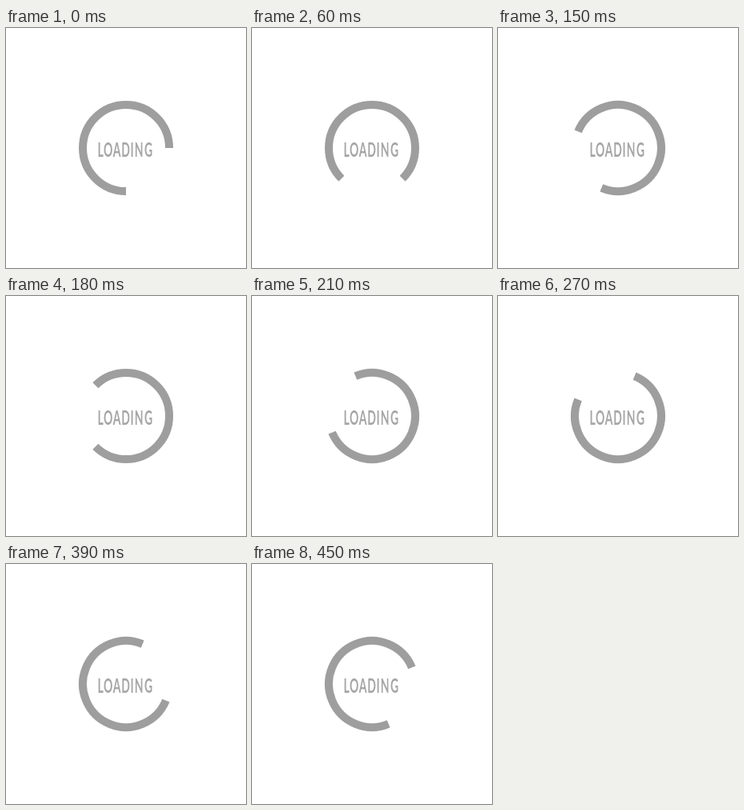
An HTML page for the animation above (480 ms loop, 300x300 px).

```html
<!DOCTYPE html>
<html lang="en">
<head>
<meta charset="utf-8">
<title>Loading</title>
<style>
  html, body { margin: 0; width: 100%; height: 100%; overflow: hidden; background: #fff; }
  svg { display: block; width: 100vw; height: 100vh; }
  text { font: 700 25px Lato, "Open Sans", sans-serif; text-anchor: middle; fill: #a6a6a6; }
</style>
</head>
<body>
<svg viewBox="0 0 300 300">
  <!-- three quarters of a circle, open at the lower right -->
  <path id="ring" d="M150 204A54 54 0 1 1 204 150" fill="none" stroke="#9e9e9e" stroke-width="10"/>
  <!-- condensed lettering -->
  <g transform="translate(150 161) scale(.56 1)">
    <text x="-57 -40 -20.5 -1 13.6 29 50" y="0">LOADING</text>
  </g>
</svg>
<script>
  const STEP_MS = 30;
  const STEPS = 16;
  const ring = document.getElementById('ring');

  function draw(now) {
    const step = Math.floor(now / STEP_MS) % STEPS;
    ring.setAttribute('transform', `rotate(${step * 360 / STEPS} 150 150)`);
  }

  const start = performance.now();
  function tick() {
    draw(performance.now() - start);
    requestAnimationFrame(tick);
  }
  tick();
</script>
</body>
</html>
```
